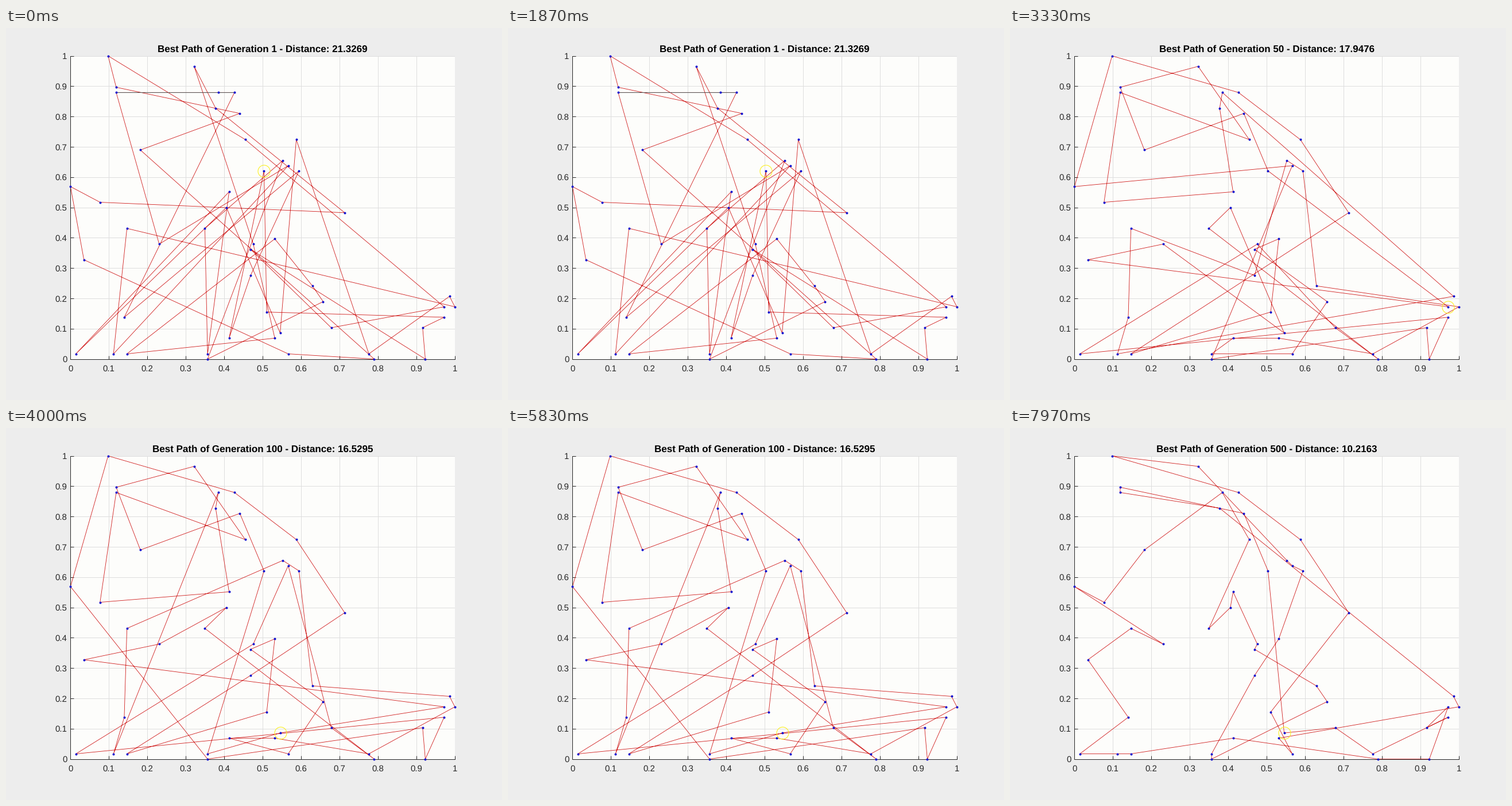
Recreate the animation shown at these times as a matplotlib script. Size 864x648 px, loop 8 s.

```python
import matplotlib.pyplot as plt
import numpy as np
from matplotlib.animation import FuncAnimation

INTERVAL = 40
FRAMES = 200
HOLD = 2000  # ms each generation stays on screen

plt.rcParams["font.family"] = "Liberation Sans"
plt.rcParams["text.hinting"] = "none"

INK = "#262626"

# Cities on a 143 by 58 map, listed in the order of the best tour found
CITIES = np.array([
    (78, 5), (97, 6), (111, 1), (139, 8), (131, 6), (139, 10), (132, 0),
    (113, 0), (59, 4), (21, 1), (16, 1), (2, 1), (20, 8), (5, 19), (21, 25),
    (33, 22), (0, 33), (11, 30), (26, 40), (55, 51), (65, 42), (50, 25),
    (58, 29), (59, 32), (68, 22), (67, 21), (90, 14), (94, 11), (51, 0),
    (51, 1), (67, 16), (76, 23), (85, 36), (81, 37), (79, 38), (46, 56),
    (14, 58), (61, 51), (84, 42), (102, 28), (73, 9), (81, 1), (76, 4),
    (143, 10), (141, 12), (54, 48), (17, 51), (17, 52), (63, 47), (72, 36),
]) / (143, 58)


def relocate(tour, moves):
    """Mutate a tour: take each city out and put it back after another."""
    tour = list(tour)
    for city, after in moves:
        tour.remove(city)
        tour.insert(tour.index(after) + 1, city)
    return tour


def rotate(tour, start):
    i = tour.index(start)
    return tour[i:] + tour[:i]


random_tour = [
    49, 40, 3, 4, 6, 25, 1, 5, 20, 36, 47, 48, 18, 7, 41, 13, 16, 17, 39, 45,
    35, 24, 42, 9, 31, 26, 27, 28, 34, 21, 29, 23, 11, 22, 0, 38, 2, 44, 43,
    14, 10, 33, 15, 46, 19, 37, 12, 32, 30, 8]
improved = [
    5, 13, 15, 0, 22, 21, 7, 1, 24, 11, 3, 6, 4, 28, 33, 16, *range(36, 40),
    9, 40, 31, 25, 27, 41, 29, 8, 42, 2, 43, 26, 32, 34, 30, 14, 12, 10, 44,
    19, 45, 23, 17, 46, 20, 35, 47, 18, 48, 49]
mutated = relocate(improved, [(29, 49), (0, 29), (33, 1), (30, 39), (44, 43)])
best = list(range(len(CITIES)))

STAGES = [(1, random_tour), (50, improved), (100, rotate(mutated, 0)),
          (500, best)]


def closed_path(tour):
    return CITIES[tour + tour[:1]]


def length(path):
    return np.hypot(*np.diff(path, axis=0).T).sum()


fig = plt.figure(figsize=(12, 9), dpi=72, facecolor="#ededed")
ax = fig.add_axes([0.13, 0.11, 0.775, 0.815], facecolor="#fdfdfb")
ax.set(xlim=(0, 1), ylim=(0, 1))
ticks = np.arange(11) / 10
labels = [f"{t:g}" for t in ticks]
ax.set_xticks(ticks, labels)
ax.set_yticks(ticks, labels)
ax.tick_params(direction="in", length=6, width=1, color=INK,
               labelcolor=INK, labelsize=15)
ax.tick_params(axis="x", pad=10)
ax.tick_params(axis="y", pad=6)
ax.grid(color="#dedede", linewidth=1)
ax.set_axisbelow(True)
for side in ("left", "bottom"):
    ax.spines[side].set(color=INK, linewidth=1, zorder=3.5)
for side in ("top", "right"):
    ax.spines[side].set_visible(False)

title = ax.text(0.5, 1 + 6.5 / 528, "", transform=ax.transAxes, ha="center",
                va="baseline", fontsize=17, weight="bold", color="black")
route, = ax.plot([], [], color="#d01c1c", lw=0.85, clip_on=False, zorder=3)
flat, = ax.plot(*CITIES[[46, 37]].T, color="#555555", lw=1, zorder=3.1)
start, = ax.plot([], [], "o", ms=21, mfc="none", mec="#fbf020", mew=1.1,
                 clip_on=False, zorder=3.2)
ax.plot(*CITIES.T, "o", ms=4, mfc="#1212d0", mec="none", clip_on=False,
        zorder=4)


def update(frame):
    generation, tour = STAGES[frame * INTERVAL // HOLD]
    path = closed_path(tour)
    route.set_data(*path.T)
    start.set_data(*path[:1].T)
    flat.set_visible(generation == 1)
    title.set_text(f"Best Path of Generation {generation} - "
                   f"Distance: {length(path):.4f}")
    return route, start, flat, title


anim = FuncAnimation(fig, update, frames=FRAMES, interval=INTERVAL,
                     init_func=lambda: update(0), repeat=True, repeat_delay=0)
plt.show()
```
